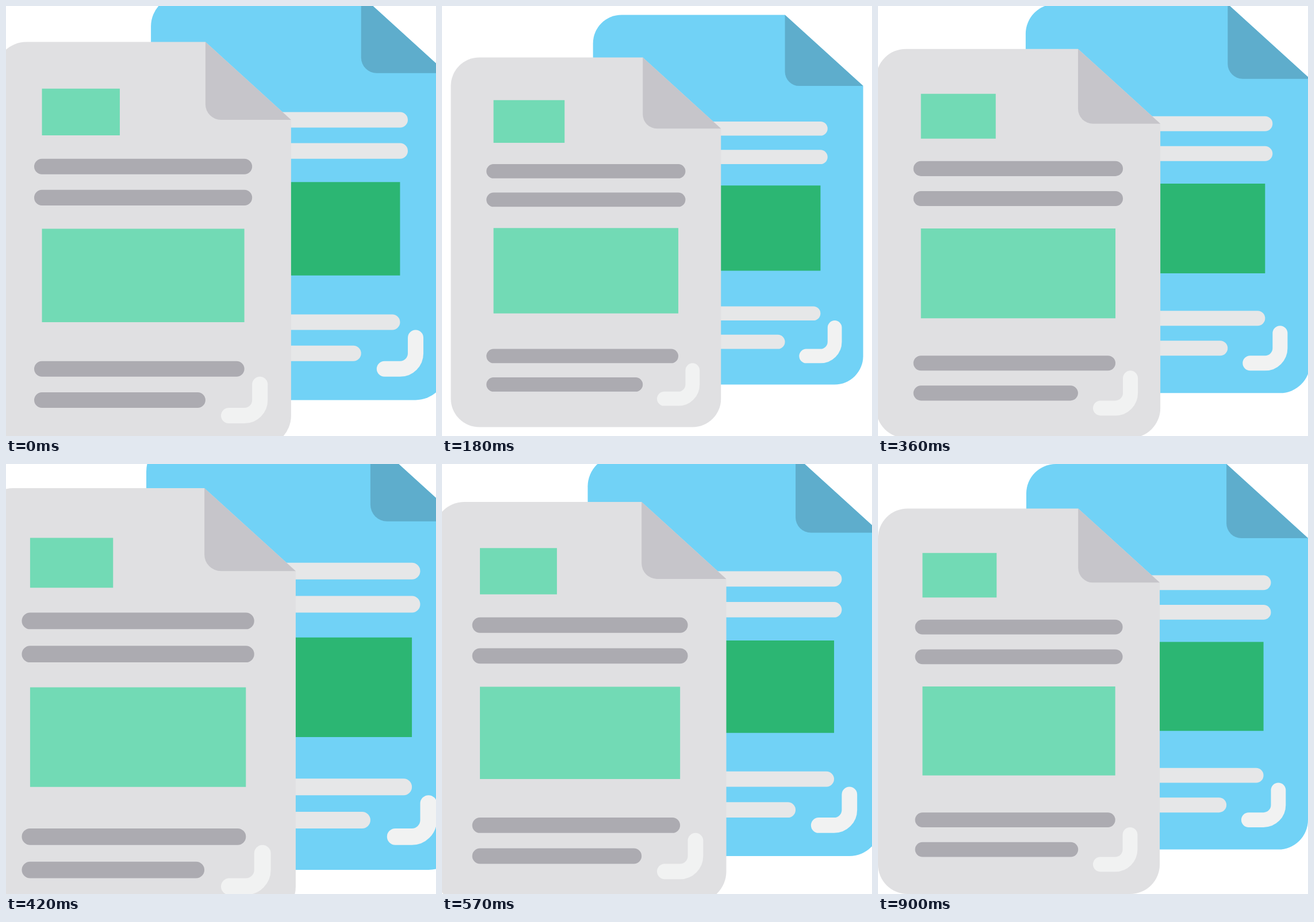
Recreate the animation shown at these times as an HTML page with a canvas. Size 748 px wide and 748 px high, loop 930 ms.

```html
<!DOCTYPE html>
<html lang="en">
<head>
<meta charset="utf-8">
<title>Documents heartbeat</title>
<style>
  html, body { margin: 0; width: 100%; height: 100%; overflow: hidden; background: #fff; }
  canvas { display: block; width: 748px; height: 748px; }
</style>
</head>
<body>
<canvas id="stage" width="748" height="748"></canvas>
<script>
const SIZE = 748;
const GRID = 58; // the artwork sits on a 58-unit grid
const STEP_MS = 30;
const STEPS = 31;
const ctx = document.getElementById('stage').getContext('2d');

// [progress, scale]
const BEAT = [[0, 1.05], [0.05, 1.25], [0.39, 0.9], [0.45, 1.15], [0.6, 1.05], [1, 1]];

const FRONT = {
  x: 0, y: 6, paper: '#e0e0e2', fold: '#c6c5ca', line: '#acabb1',
  picture: '#72dab5', thumbnail: true
};
const BACK = {
  x: 20, y: 0, paper: '#71d2f6', fold: '#5eadcc', line: '#e6e7e8',
  picture: '#2cb673', thumbnail: false
};

function bezier(u, a, b) {
  const v = 1 - u;
  return 3 * a * u * v * v + 3 * b * u * u * v + u * u * u;
}

// cubic-bezier(0.215, 0.61, 0.355, 1)
function easeOut(x) {
  let lo = 0, hi = 1;
  for (let i = 0; i < 30; i++) {
    const mid = (lo + hi) / 2;
    if (bezier(mid, 0.215, 0.355) < x) lo = mid; else hi = mid;
  }
  return bezier((lo + hi) / 2, 0.61, 1);
}

function scaleAt(p) {
  let i = 0;
  while (i < BEAT.length - 2 && p >= BEAT[i + 1][0]) i++;
  const [p0, s0] = BEAT[i], [p1, s1] = BEAT[i + 1];
  return s0 + (s1 - s0) * easeOut((p - p0) / (p1 - p0));
}

function fillPath(d, color) {
  ctx.fillStyle = color;
  ctx.fill(new Path2D(d));
}

function strokePath(d, color) {
  ctx.strokeStyle = color;
  ctx.stroke(new Path2D(d));
}

function drawPage(page) {
  ctx.save();
  ctx.translate(page.x, page.y);
  ctx.lineWidth = 2;
  ctx.lineCap = 'round';

  fillPath('M4 0H27L38 10V48A4 4 0 0 1 34 52H4A4 4 0 0 1 0 48V4A4 4 0 0 1 4 0Z', page.paper);
  fillPath('M27 0L38 10H29A2 2 0 0 1 27 8Z', page.fold);

  if (page.thumbnail) fillPath('M6 6H16V12H6Z', page.picture);
  fillPath('M6 24H32V36H6Z', page.picture);

  strokePath('M6 16H32M6 20H32M6 42H31M6 46H26', page.line);
  strokePath('M34 44V46A2 2 0 0 1 32 48H30', '#f1f2f2');
  ctx.restore();
}

function draw(now) {
  const step = Math.floor(now / STEP_MS) % STEPS;
  const scale = scaleAt(step / (STEPS - 1)) * SIZE / GRID;

  ctx.setTransform(1, 0, 0, 1, 0, 0);
  ctx.fillStyle = '#fff';
  ctx.fillRect(0, 0, SIZE, SIZE);

  ctx.translate(SIZE / 2, SIZE / 2);
  ctx.scale(scale, scale);
  ctx.translate(-GRID / 2, -GRID / 2);
  drawPage(BACK);
  drawPage(FRONT);
}

const start = performance.now();
function tick() {
  draw(performance.now() - start);
  requestAnimationFrame(tick);
}
tick();
</script>
</body>
</html>
```
